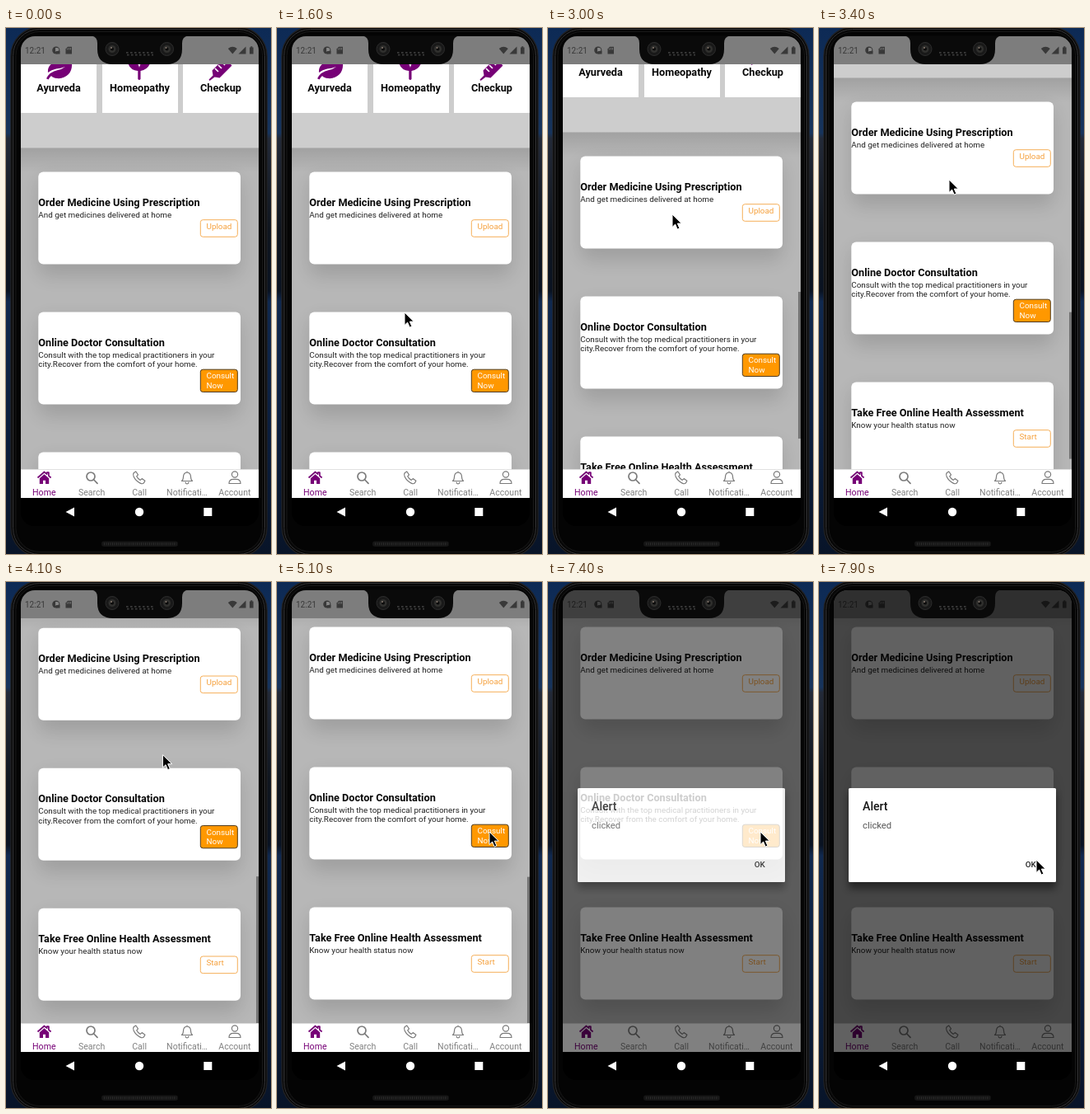
Recreate the animation shown at these times as an HTML page. Size 322 by 638 pixels, loop 8000 ms.

```html
<!DOCTYPE html>
<html lang="en">
<head>
<meta charset="utf-8">
<title>Health app</title>
<style>
html, body { margin: 0; width: 100%; height: 100%; overflow: hidden; background: #0c1626; }
svg { display: block; width: 322px; height: 638px; font-family: Roboto, "Open Sans", sans-serif; }
.title { font-size: 12.69px; font-weight: 700; fill: #080808; }
.body { font-size: 9.87px; fill: #222; }
.tab { font-size: 10.57px; fill: #808080; text-anchor: middle; }
.line { fill: none; stroke: #7b7b7b; stroke-width: 1.2; stroke-linecap: round; stroke-linejoin: round; }
.mid { text-anchor: middle; }
</style>
</head>
<body>
<svg viewBox="0 0 322 638">
  <defs>
    <linearGradient id="sky" x2="0" y2="1">
      <stop offset="0" stop-color="#0d2a55"/><stop offset=".2" stop-color="#17345c"/>
      <stop offset=".21" stop-color="#232a38"/><stop offset=".38" stop-color="#10161f"/>
      <stop offset=".5" stop-color="#0a1322"/><stop offset=".52" stop-color="#10294f"/>
      <stop offset=".8" stop-color="#0b1d3b"/><stop offset="1" stop-color="#081428"/>
    </linearGradient>
    <linearGradient id="under" x2="0" y2="1">
      <stop offset="0" stop-color="#000" stop-opacity=".12"/><stop offset="1" stop-color="#000" stop-opacity="0"/>
    </linearGradient>
    <filter id="soft" x="-30%" y="-50%" width="160%" height="200%"><feGaussianBlur stdDeviation="11"/></filter>
    <filter id="near" x="-20%" y="-30%" width="140%" height="160%"><feGaussianBlur stdDeviation="5"/></filter>
    <clipPath id="screen"><rect x="18" y="10" width="289" height="594" rx="17"/></clipPath>
    <clipPath id="view"><rect x="18" y="44" width="289" height="491.500"/></clipPath>
  </defs>

  <rect width="322" height="638" fill="url(#sky)"/>
  <rect x="6" y="-1" width="311" height="642" rx="35" fill="#050505" stroke="#202022" stroke-width="1.500"/>
  <rect x="8.500" y="1.500" width="306" height="637" rx="32" fill="#080808" stroke="#353537" stroke-width="1"/>
  <rect x="12" y="4.500" width="299.500" height="631" rx="29" fill="#040404" stroke="#171717"/>

  <g clip-path="url(#screen)">
    <rect x="18" y="10" width="289" height="594" fill="#000"/>
    <rect x="18" y="44" width="289" height="492" fill="#b7b7b7"/>
    <g clip-path="url(#view)">
      <g id="page"></g>
      <rect id="bar" x="304" width="3" height="178" fill="#747474"/>
    </g>

    <rect x="18" y="10" width="289" height="34" fill="#7d7d7d"/>
    <g fill="#393939">
      <text x="23" y="30.500" font-size="10">12:21</text>
      <circle cx="60.800" cy="27" r="4.600"/>
      <path d="M60 24h2a2 2 0 0 1 0 4.500h-2z" fill="#858585"/>
      <path d="M61 28h4.500v3.500h-4.500z"/>
      <path d="M72.500 25.500l2.500-2.800h5v8.800h-7.500z"/>
      <path d="M74.500 24.500v2M76.500 24v2.500M78.500 24v2.500" stroke="#858585" stroke-width=".8"/>
      <path d="M269.800 25q5.500-4.500 11 0l-5.500 6.500z"/>
      <path d="M291.500 22.500v9h-9z"/>
      <path d="M296 23.500h1.300v-1.200h2v1.200h1.300v8h-4.600z"/>
    </g>

    <rect x="18" y="535.500" width="289" height="34.500" fill="#fff"/>
    <path d="M18 535.500h289" stroke="#dedede" stroke-width=".7"/>
    <g id="tabs"></g>
    <g id="icons">
      <path d="M38.500 545.500l8-7 3.200 2.700v-2h2.200v4l2.700 2.300" fill="none" stroke="#760076" stroke-width="1.700" stroke-linejoin="round"/>
      <path d="M40.800 546.200l5.700-5 5.700 5v6.700h-4.200v-4.200h-3v4.200h-4.200z" fill="#760076"/>
      <g class="line">
        <g stroke-width="1.700"><circle cx="103" cy="544" r="5"/><path d="M106.800 548l4.200 4.300"/></g>
        <path d="M155.300 539.500l2.500-1.500 2.700 3.800-1.800 2q1.500 3 4.500 4.600l2-1.800 3.700 2.600-1.500 2.700q-1.500 1.600-4.300.2-5.500-2.500-8-8-1.300-2.800.2-4.600z"/>
        <path d="M213.500 549.500q2-1.500 2-5 0-5 4.500-5.500 4.500.5 4.500 5.500 0 3.500 2 5zM218 551q.5 2 2 2t2-2M220 539v-1"/>
        <circle cx="278" cy="541.500" r="3.600"/>
        <path d="M271 552.500q0-5.200 5-5.200h4q5 0 5 5.200z"/>
      </g>
    </g>

    <g id="dim">
      <rect x="18" y="10" width="289" height="560" fill="#000" opacity=".62"/>
      <rect x="36" y="257" width="252" height="115" fill="#000" opacity=".45" filter="url(#near)"/>
      <rect x="36" y="250" width="252" height="114" rx="1.500" fill="#fff"/>
      <text x="53" y="277.300" font-size="14.100" font-weight="500" fill="#151515">Alert</text>
      <text x="53" y="299" font-size="11.280" fill="#555">clicked</text>
      <text x="250.700" y="346.300" font-size="9.870" font-weight="500" fill="#222">OK</text>
    </g>

    <rect x="18" y="570" width="289" height="34" fill="#000"/>
    <g fill="#fff">
      <path d="M72.500 587l10.500-5.600v11.200z"/>
      <circle cx="162" cy="587" r="5.200"/>
      <rect x="240.300" y="582" width="10" height="10"/>
    </g>
  </g>

  <path d="M104 9.500q7 1 7 9v7q0 18.500 19 18.500h65q19 0 19-18.500v-7q0-8 7-9z" fill="#0a0a0a"/>
  <g id="lens"></g>
  <rect x="116" y="622.500" width="93" height="6.500" rx="3.200" fill="#151515"/>
  <path d="M119 625.800h88" stroke="#2c2c2c" stroke-width="3" stroke-dasharray="1 1.500"/>
  <path d="M146 29.800h33M147 32.600h32" stroke="#3a3a3a" stroke-width="1.700" stroke-dasharray="2.500 2.500"/>

  <path id="cursor" d="M0 0v15.500l3.600-3.400 2.600 6 2.700-1.200-2.600-5.800h5z" fill="#000" stroke="#fff" stroke-width="1" stroke-linejoin="round"/>
</svg>
<script>
const LOOP = 8000, STEP = 100;
const $ = id => document.getElementById(id);
const text = (x, y, cls, str, extra = '') => `<text x="${x}" y="${y}" class="${cls}" ${extra}>${str}</text>`;

const cards = [
  { y: 174.5, title: 'Order Medicine Using Prescription', lines: ['And get medicines delivered at home'], button: ['Upload'] },
  { y: 344.5, title: 'Online Doctor Consultation',
    lines: ['Consult with the top medical practitioners in your', 'city.Recover from the comfort of your home.'],
    button: ['Consult', 'Now'] },
  { y: 514.5, title: 'Take Free Online Health Assessment', lines: ['Know your health status now'], button: ['Start'] }
];

function button(labels, y) {
  const solid = labels.length > 1;
  const paint = solid ? 'fill="#ff9800" stroke="#4d3a1c"' : 'fill="#fff" stroke="#f5ae58"';
  return `<rect x="236.300" y="${y}" width="45" height="${solid ? 27.3 : 20.6}" rx="3" ${paint}/>` +
    labels.map((s, i) => text(243.5, y + 11.2 + i * 11.5, 'body', s, `style="fill:${solid ? '#fff' : '#f5a03c'}"`)).join('');
}

function card({ y, title, lines, button: labels }) {
  return `<rect x="39" y="${y + 8}" width="246" height="118" rx="12" opacity=".13" filter="url(#soft)"/>
    <rect x="39.300" y="${y}" width="245.700" height="112" rx="6" fill="#fff"/>` +
    text(39.3, y + 41.3, 'title', title) +
    lines.map((s, i) => text(39.3, y + 55.3 + i * 11.5, 'body', s)).join('') +
    button(labels, y + 46.7 + lines.length * 11.5);
}

const services = [['Ayurveda', 18, 64], ['Homeopathy', 117, 162.5], ['Checkup', 215, 261]];
$('page').innerHTML =
  '<rect x="18" y="0" width="289" height="145.500" fill="#cdcdcd"/>' +
  '<rect x="18" y="145.500" width="289" height="30" fill="url(#under)"/>' +
  services.map(([name, x, mid]) =>
    `<rect x="${x}" y="0" width="92" height="103" fill="#fff"/>` + text(mid, 77.3, 'title mid', name)).join('') +
  `<g fill="#760076">
    <path d="M78 34q5 14-2 22-6 6-14 5-5-.5-7-3-2 1.500-3.500 4.500l-2.500-1.200q4-8.300 14-10.300 5-1 9-4-6 2-11 2.500-6 1-10 4.500-1-10 10-13 12-1 17-7z"/>
    <path d="M160.300 62v-10q-12-1-12.800-14 12 0 14.500 10 2-10 14.500-12-1 14-13 16v10q-1.600 2-3.200 0z"/>
    <path d="M246.500 62.500l5-5-1-6 15-15 9 9-15 15-6-1-6 4.500zM268 33l9 9-2 2-9-9z"/>
    <path d="M254 49l4 4M258 45l4 4M262 41l4 4" stroke="#fff" stroke-width="1.600"/>
  </g>` +
  cards.map(card).join('');

$('tabs').innerHTML = ['Home', 'Search', 'Call', 'Notificati…', 'Account']
  .map((s, i) => text(46.3 + i * 57.9, 567, 'tab', s, i ? '' : 'style="fill:#760076"')).join('');

$('lens').innerHTML = [129, 195.5].map(x =>
  `<circle cx="${x}" cy="25.500" r="8" fill="#191919" stroke="#2d2d2d"/>
   <circle cx="${x}" cy="25.500" r="4.500" fill="#30302e"/>
   <circle cx="${x}" cy="25.500" r="2" fill="#0c0c0c"/>
   <circle cx="${x - 1}" cy="24" r="1" fill="#8a7b70"/>`).join('');

// Rows: time, then values
const scrollPath = [[2500, 0], [2800, 7], [3000, 19], [3200, 52], [3400, 85], [3600, 104], [3900, 116], [4200, 120]];
const dimPath = [[7200, 0], [7300, .4], [7400, .8], [7500, 1]];
const cursorPath = [
  [1000, 322, 460], [1300, 190, 374], [1500, 155, 353], [1600, 155, 345], [1800, 154.5, 336], [2000, 154, 332],
  [2600, 150, 256], [3000, 151, 226], [3400, 158, 184], [3800, 164, 176], [4300, 208, 232],
  [4700, 246, 286], [5000, 258, 303], [7600, 258, 303], [7700, 259, 310], [7900, 264, 337]
];

function at(path, t) {
  const i = path.findIndex(row => row[0] > t);
  if (i === 0) return path[0].slice(1);
  if (i < 0) return path[path.length - 1].slice(1);
  const a = path[i - 1], b = path[i], k = (t - a[0]) / (b[0] - a[0]);
  return a.slice(1).map((v, j) => v + (b[j + 1] - v) * k);
}

function draw(now) {
  const t = Math.floor((now % LOOP) / STEP) * STEP;
  const [scroll] = at(scrollPath, t);
  const [x, y] = at(cursorPath, t);
  $('page').setAttribute('transform', `translate(0 ${-scroll})`);
  $('bar').setAttribute('y', 313 + scroll * .372);
  $('bar').style.opacity = t > 2500 && t < 5800 ? 1 : 0;
  $('dim').style.opacity = at(dimPath, t)[0];
  $('cursor').setAttribute('transform', `translate(${x} ${y})`);
  $('cursor').style.opacity = t > 1000 ? 1 : 0;
}

const start = performance.now();
function tick() {
  draw(performance.now() - start);
  requestAnimationFrame(tick);
}
tick();
</script>
</body>
</html>
```
